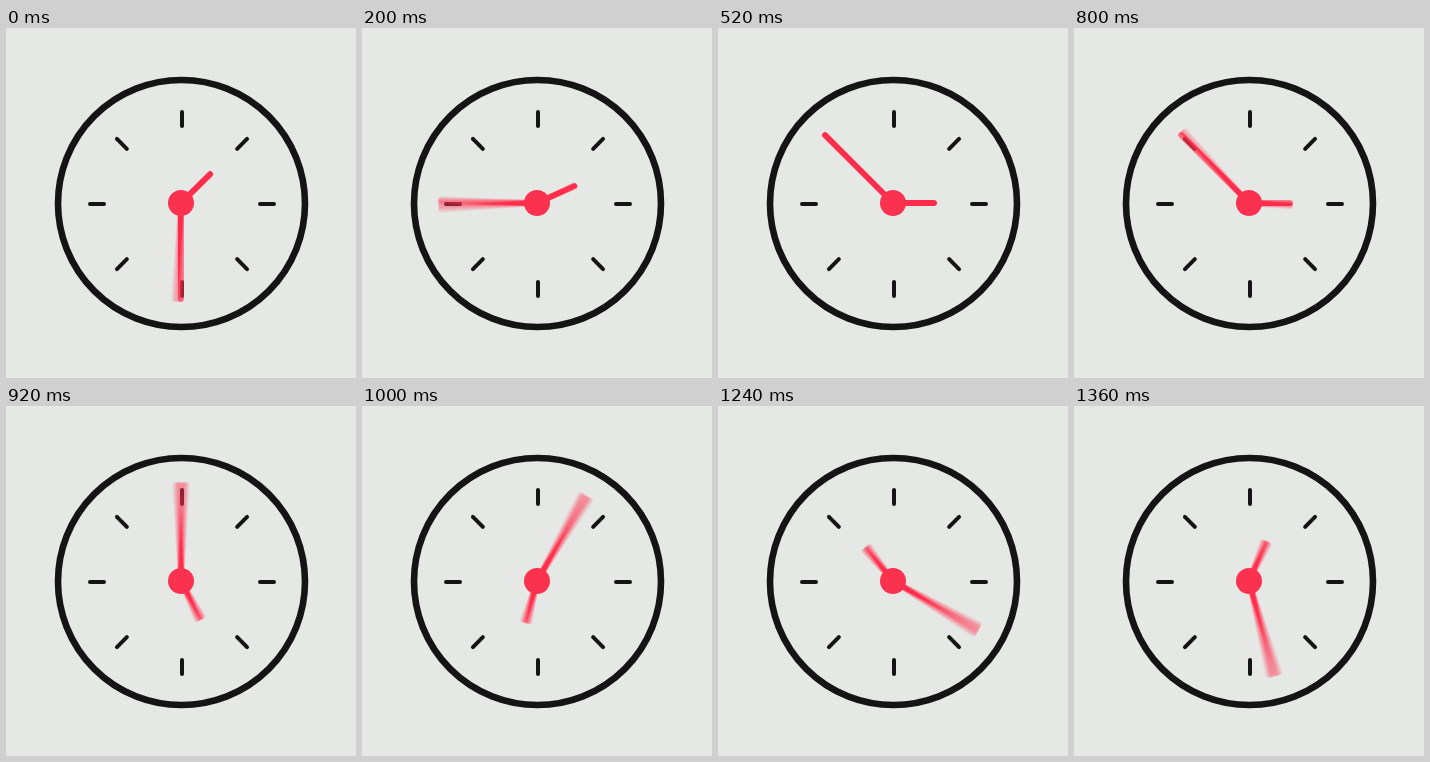
Recreate the animation shown at these times as an HTML page with a canvas. Size 350 by 350 pixels, loop 1.4 s.

```html
<!DOCTYPE html>
<html lang="en">
<head>
<meta charset="utf-8">
<title>Clock</title>
<style>
  html, body { margin: 0; width: 100%; height: 100%; overflow: hidden; background: #e6e8e5; }
  canvas { display: block; width: 350px; height: 350px; }
</style>
</head>
<body>
<canvas id="stage" width="350" height="350"></canvas>
<script>
const SIZE = 350, LOOP = 1400, STEP = 40;
const SHUTTER = 20, SAMPLES = 15;
const BG = '#e6e8e5', INK = '#141414', RED = '#fa3250';

const ctx = document.getElementById('stage').getContext('2d');
const layer = document.createElement('canvas');
layer.width = layer.height = SIZE;
const blur = layer.getContext('2d');

const mix = (a, b, p) => a + (b - a) * p;
const easeOut = p => 1 - Math.pow(1 - p, 1.8);

// Angles in degrees, clockwise from twelve, at 0, 200, 520 and 1400 ms.
const hands = [
  { keys: [45, 65.5, 90, 405], length: 41 },
  { keys: [180, 270, 315, 540], length: 96 }
];

function angleAt([a, b, c, d], t) {
  if (t < 200) return mix(a, b, Math.max(t, 0) / 200);
  if (t < 520) return mix(b, c, easeOut((t - 200) / 320));
  if (t < 800) return c;
  return mix(c, d, (t - 800) / 600);
}

function spoke(g, cx, cy, deg, from, to, width, color) {
  const a = deg * Math.PI / 180, x = Math.sin(a), y = -Math.cos(a);
  g.strokeStyle = color;
  g.lineWidth = width;
  g.lineCap = 'round';
  g.beginPath();
  g.moveTo(cx + x * from, cy + y * from);
  g.lineTo(cx + x * to, cy + y * to);
  g.stroke();
}

function drawFace() {
  ctx.fillStyle = BG;
  ctx.fillRect(0, 0, SIZE, SIZE);
  ctx.strokeStyle = INK;
  ctx.lineWidth = 6.6;
  ctx.beginPath();
  ctx.arc(175.5, 175.5, 123.5, 0, Math.PI * 2);
  ctx.stroke();
  for (let deg = 0; deg < 360; deg += 45) spoke(ctx, 176, 176, deg, 78, 92, 4, INK);
}

// Averages the hand positions over the shutter time.
function drawHands(t) {
  blur.clearRect(0, 0, SIZE, SIZE);
  blur.globalCompositeOperation = 'lighter';
  blur.globalAlpha = 1 / SAMPLES;
  for (let i = 0; i < SAMPLES; i++) {
    const s = t + SHUTTER * ((i + 0.5) / SAMPLES - 0.5);
    for (const { keys, length } of hands) {
      spoke(blur, 175, 175, angleAt(keys, s), 0, length, 6, RED);
    }
  }
  ctx.drawImage(layer, 0, 0);
  ctx.fillStyle = RED;
  ctx.beginPath();
  ctx.arc(175, 175, 13, 0, Math.PI * 2);
  ctx.fill();
}

const start = performance.now();

function frame() {
  const t = (performance.now() - start + 0.5) % LOOP;
  drawFace();
  drawHands(Math.floor(t / STEP) * STEP);
  requestAnimationFrame(frame);
}
frame();
</script>
</body>
</html>
```
